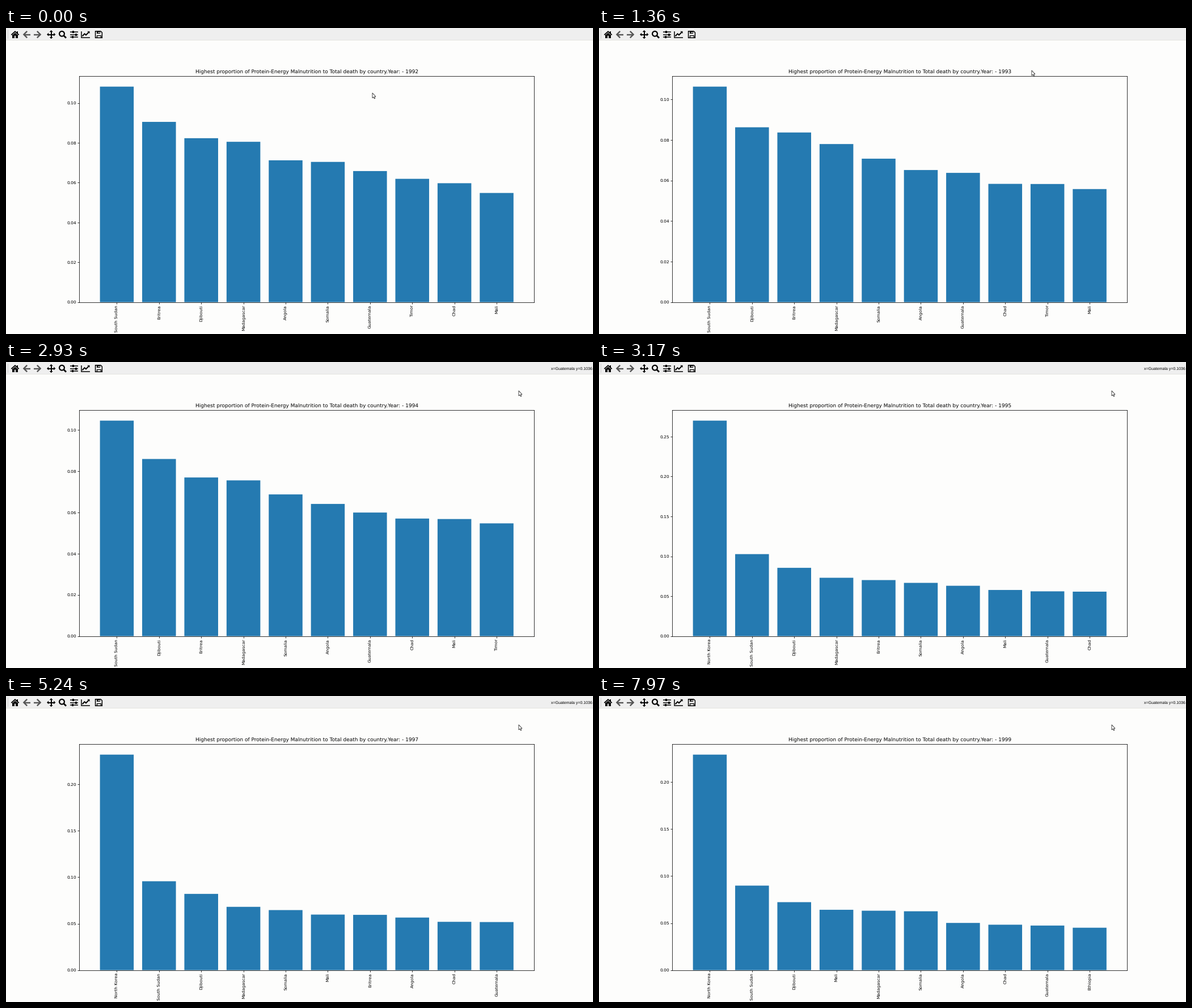
A matplotlib script for the animation above (8000 ms loop, 1035 by 541 pixels).

```python
import numpy as np
import matplotlib.pyplot as plt
from matplotlib.animation import FuncAnimation
from matplotlib.patches import Circle, Polygon, Rectangle

W, H, DPI = 1035, 541, 64
PX = 72 / DPI                      # points per pixel
FRAMES, INTERVAL = 200, 40
FIRST_CHANGE, YEAR_MS = 1118, 1006
READOUT_MS = 1500
FIRST_YEAR = 1992
PAPER, TOOLBAR, BAR, INK, GREY = "#fdfdfc", "#efefef", "#257ab1", "#000000", "#555555"

plt.rcParams.update({
    "font.family": "DejaVu Sans",
    "text.hinting": "none",
    "axes.linewidth": 0.8 * PX,
})

# Turning points of each country's share; the years between are linear.
TRENDS = {
    "North Korea": {1994: 0, 1995: .2700, 1996: .2335, 1999: .2293},
    "South Sudan": {1992: .1082, 1996: .1009, 1998: .0905, 1999: .0899},
    "Djibouti": {1992: .0823, 1993: .0863, 1996: .0852, 1998: .0790, 1999: .0723},
    "Eritrea": {1992: .0905, 1995: .0702, 1998: .0542, 1999: .0440},
    "Madagascar": {1992: .0805, 1999: .0632},
    "Angola": {1992: .0712, 1993: .0652, 1996: .0620, 1998: .0512, 1999: .0502},
    "Somalia": {1992: .0704, 1993: .0708, 1995: .0667, 1999: .0626},
    "Guatemala": {1992: .0658, 1993: .0638, 1995: .0561, 1999: .0474},
    "Timor": {1992: .0619, 1999: .0367},
    "Chad": {1992: .0597, 1995: .0557, 1999: .0483},
    "Mali": {1992: .0548, 1998: .0608, 1999: .0642},
    "Ethiopia": {1999: .0451},
}


def ranking(year, count=10):
    shares = {name: np.interp(year, list(keys), list(keys.values()))
              for name, keys in TRENDS.items()}
    names = sorted(shares, key=shares.get, reverse=True)[:count]
    return names, [shares[name] for name in names]


fig = plt.figure(figsize=(W / DPI, H / DPI), dpi=DPI, facecolor=PAPER)

left, right, top_edge, bottom_edge = 129.2, 931.3, 84.6, 484.6
ax = fig.add_axes([left / W, 1 - bottom_edge / H,
                   (right - left) / W, (bottom_edge - top_edge) / H],
                  facecolor=PAPER)
bars = ax.bar(range(10), np.ones(10), color=BAR, snap=False)
ax.set_xlim(-0.89, 9.89)
ax.tick_params(labelsize=7.48 * PX, length=2.6 * PX, pad=2.6 * PX, width=0.8 * PX)
ax.yaxis.set_major_formatter("{x:.2f}")
title = ax.set_title("", fontsize=8.97 * PX, pad=4.6 * PX)

# Overlay in stage pixels, y pointing down.
ui = fig.add_axes([0, 0, 1, 1])
ui.set_xlim(0, W)
ui.set_ylim(H, 0)
ui.axis("off")


def fill(points, color=INK):
    ui.add_patch(Polygon(points, closed=True, fc=color, ec="none"))


def box(x, y, w, h, color=INK):
    ui.add_patch(Rectangle((x, y), w, h, fc=color, ec="none"))


def stroke(points, width, color=INK):
    ui.plot(*zip(*points), color=color, lw=width * PX,
            solid_capstyle="butt", solid_joinstyle="miter")


def draw_toolbar():
    box(0, 0, W, 21, TOOLBAR)
    box(0, 21, W, 1, "#e4e4e0")
    box(3, 3, 1, 16, "#d0d0d0")

    # home
    stroke([(9.3, 12.2), (16, 6.2), (22.7, 12.2)], 1.8)
    box(11.3, 11.5, 3.3, 6)
    box(17.4, 11.5, 3.3, 6)
    box(19.2, 6.2, 1.8, 4)
    fill([(11.3, 13.6), (11.3, 12.6), (16, 8.5), (20.7, 12.6), (20.7, 13.6)])

    # back and forward
    for place in (lambda x: x, lambda x: 92 - x):
        stroke([(place(31.5), 11.5), (place(42.8), 11.5)], 2.4, GREY)
        stroke([(place(x), y) for x, y in ((37.2, 5.7), (31.4, 11.5), (37.2, 17.3))],
               2.4, GREY)

    # pan
    cx, cy = 79.7, 11.5
    stroke([(cx - 5, cy), (cx + 5, cy)], 2)
    stroke([(cx, cy - 5), (cx, cy + 5)], 2)
    for s in (-1, 1):
        fill([(cx + 7.7 * s, cy), (cx + 4.5 * s, cy - 3), (cx + 4.5 * s, cy + 3)])
        fill([(cx, cy + 7.7 * s), (cx - 3, cy + 4.5 * s), (cx + 3, cy + 4.5 * s)])

    # zoom
    ui.add_patch(Circle((98.5, 10.2), 4.4, fc="none", ec=INK, lw=2.2 * PX))
    stroke([(101.6, 13.3), (106, 17.6)], 2.8)

    # sliders
    for y, knob in ((7, 118), (11.5, 123), (16, 117)):
        stroke([(113, y), (127, y)], 1.5)
        box(knob - 1.5, y - 2, 3, 4)

    # chart
    stroke([(132.8, 5.5), (132.8, 17.2), (148, 17.2)], 1.5)
    stroke([(134.6, 14.4), (138.5, 10.2), (141, 12.4), (146, 7.3)], 2)
    fill([(147.5, 5.8), (147.5, 10), (143.3, 5.8)])

    # save
    stroke([(157.6, 5.7), (167, 5.7), (169.4, 8.1), (169.4, 17.3),
            (157.6, 17.3), (157.6, 5)], 1.5)
    box(159.5, 6, 6.5, 4)
    box(163.4, 6.6, 1.5, 2.6, TOOLBAR)
    stroke([(160.2, 17.3), (160.2, 13), (166.8, 13), (166.8, 17.3)], 1.3)


draw_toolbar()
readout = ui.text(1034, 11.5, "x=Guatemala y=0.1036", fontsize=6.95 * PX,
                  family="Liberation Sans", ha="right", va="center")

ARROW = np.array([(0, 0), (0, 9), (2, 7.2), (3.4, 10.2), (4.8, 9.6),
                  (3.5, 6.7), (6, 6.5)])
pointer = ui.add_patch(Polygon(ARROW, closed=True, fc="white", ec="#222222",
                               lw=0.8 * PX, zorder=5))


def pointer_tip(ms):
    u = np.clip((ms - 1060) / 640, 0, 1)
    eased = u * u * (3 - 2 * u)
    return 646 + 258 * eased, 114.8 - 64 * eased ** 0.6


def update(frame):
    ms = frame * INTERVAL
    year = FIRST_YEAR + max(0, 1 + int((ms - FIRST_CHANGE) // YEAR_MS))
    names, values = ranking(year)
    top = values[0] * 1.05
    for bar, value in zip(bars, values):
        bar.set_height(value)
    ax.set_xticks(range(10), names, rotation=90)
    ax.set_yticks(np.arange(0, top, 0.02 if top < 0.15 else 0.05))
    ax.set_ylim(0, top)
    title.set_text("Highest proportion of Protein-Energy Malnutrition to Total death "
                   f"by country.Year: - {year}")
    readout.set_visible(ms >= READOUT_MS)
    pointer.set_xy(ARROW + pointer_tip(ms))
    return []


anim = FuncAnimation(fig, update, frames=FRAMES, interval=INTERVAL,
                     repeat=True, repeat_delay=0, blit=False)
plt.show()
```
